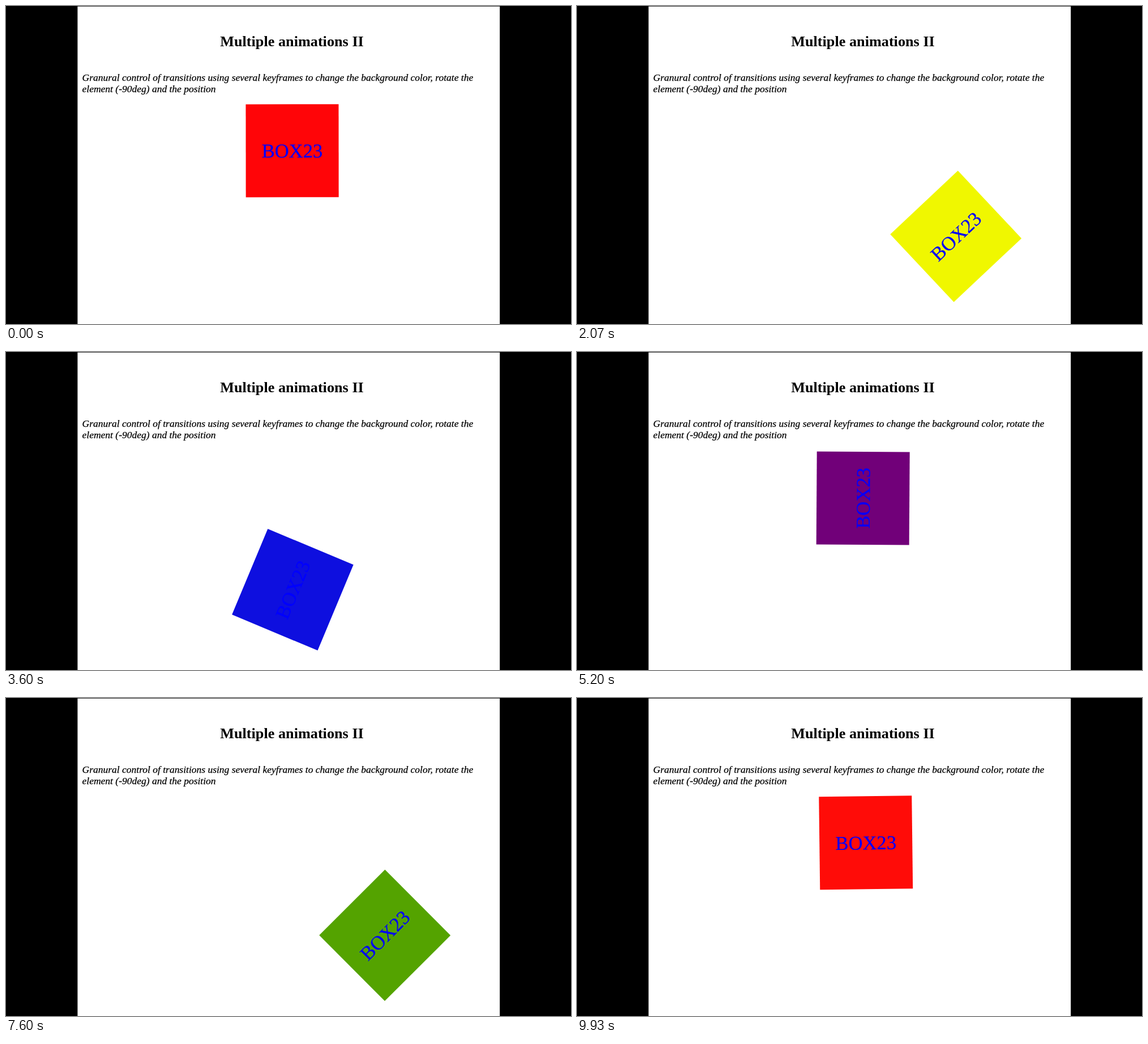
Recreate the animation shown at these times as an HTML page. Size 998 by 561 pixels, loop 10 s.

```html
<!DOCTYPE html>
<html lang="en">
<head>
<meta charset="utf-8">
<title>Multiple animations II</title>
<style>
  html, body {
    margin: 0;
    width: 100%;
    height: 100%;
    overflow: hidden;
    background: #000;
  }
  svg {
    display: block;
    width: 998px;
    height: 561px;
    font-family: "Liberation Serif", "Times New Roman", Times, serif;
  }
  .title { font-size: 26.24px; font-weight: bold; text-anchor: middle; }
  .note { font-size: 17.49px; font-style: italic; stroke: #000; stroke-width: 0.25px; }
  .label { font-size: 34.6px; text-anchor: middle; fill: #00f; stroke: #00f; stroke-width: 0.25px; }

  /* The clock script sets --t; the animations are scrubbed through their delay. */
  .box, .box rect {
    animation: move 5s ease calc(var(--t, 0) * -1ms) infinite alternate both paused;
  }
  .box rect { animation-name: tint; }

  @keyframes move {
    0%   { translate: 0 0;         rotate: 0deg; }
    25%  { translate: 164px 0;     rotate: -22.5deg; }
    50%  { translate: 164px 164px; rotate: -45deg; }
    75%  { translate: 0 164px;     rotate: -67.5deg; }
    100% { translate: 0 0;         rotate: -90deg; }
  }
  @keyframes tint {
    0%   { fill: #ff0508; }
    20%  { fill: #ff9e00; }
    40%  { fill: #ff0; }
    60%  { fill: #007600; }
    80%  { fill: #1002fb; }
    100% { fill: #740076; }
  }
</style>
</head>
<body>
<svg viewBox="0 0 998 561">
  <rect x="126.4" y="0.8" width="745.8" height="561" fill="#fff"/>
  <text class="title" x="505" y="71">Multiple animations II</text>
  <text class="note" x="134.6" y="132">Granural control of transitions using several keyframes to change the background color, rotate the</text>
  <text class="note" x="134.6" y="151.6">element (-90deg) and the position</text>
  <g transform="translate(505.2 255.3)">
    <g class="box">
      <rect x="-82" y="-82" width="164" height="164"/>
      <text class="label" x="0" y="12">BOX23</text>
    </g>
  </g>
</svg>
<script>
  const LOOP = 10000;
  const STEP = LOOP / 150; // the picture advances 15 times a second
  const LEAD = 7;
  const box = document.querySelector(".box");
  const start = performance.now();

  function tick() {
    const time = (performance.now() - start) % LOOP;
    const step = Math.floor((time + 5) / STEP) % 150;
    box.style.setProperty("--t", step * STEP + LEAD);
    requestAnimationFrame(tick);
  }
  tick();
</script>
</body>
</html>
```
